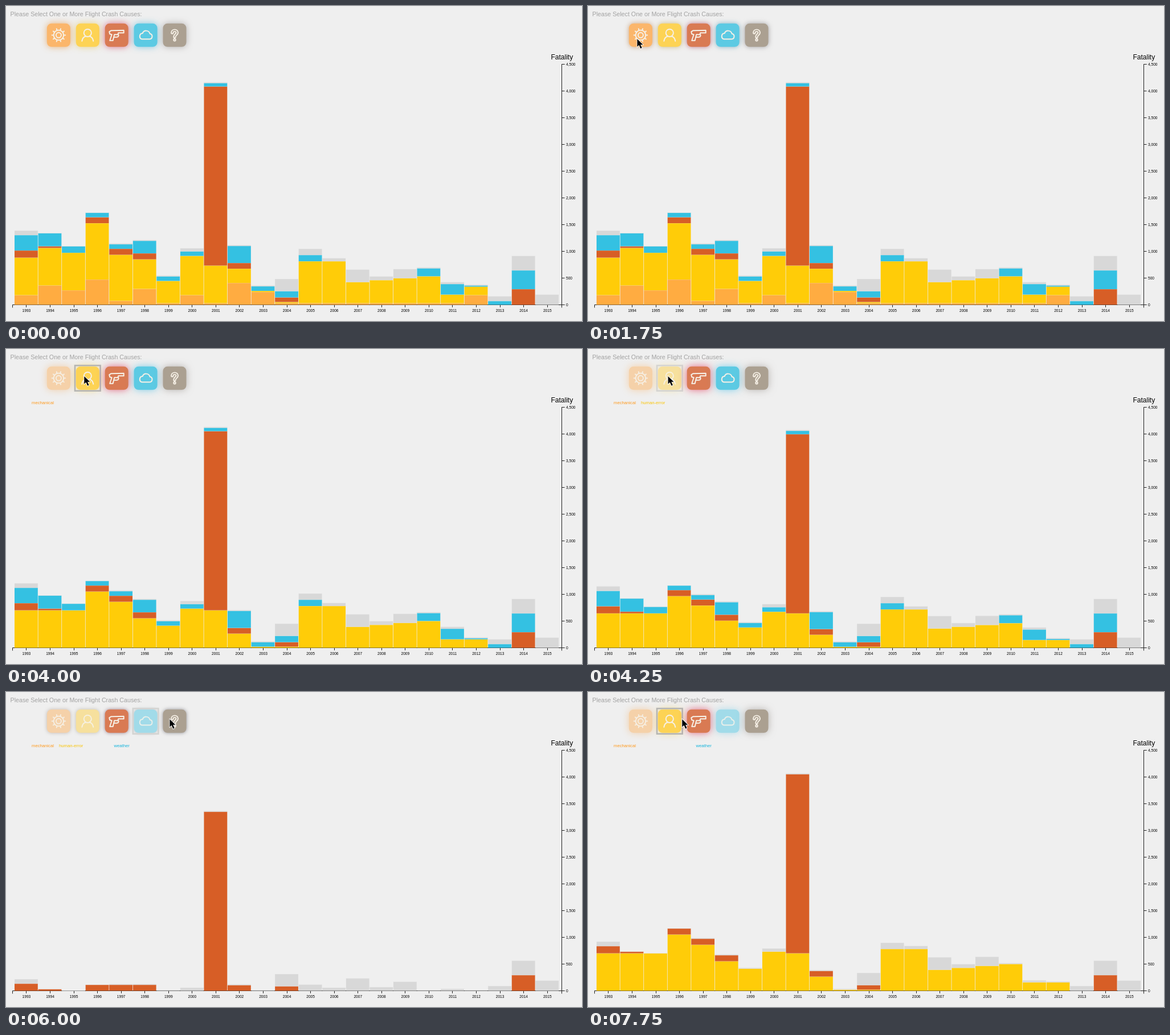
Write an HTML page with a canvas that moves like this. It is 1011 by 554 pixels and loops after 8000 ms.

```html
<!DOCTYPE html>
<html lang="en">
<head>
<meta charset="utf-8">
<title>Flight crash causes</title>
<style>
  html, body { margin: 0; width: 100%; height: 100%; overflow: hidden; background: #efefef; }
  canvas { display: block; }
</style>
</head>
<body>
<canvas id="stage" width="1011" height="554"></canvas>
<script>
const ctx = document.getElementById('stage').getContext('2d');
const LOOP = 8000, STEP = 250, DELAY = 100, FADE = 550;
const FIRST = 1993, LAST = 2015;
const BASE = 525.5, TOP = 102.5, AXIS_X = 975.5;
const BAR_X = 15, PITCH = 41.56, BAR_W = 40.8;
const FONT = '"Liberation Sans", Arial, sans-serif';
const BG = [239, 239, 239];

// Bar heights in pixels: a usual level per year, with peaks where a year stands out
const CAUSES = [
  {
    bar: '#ffac41', tint: [251, 182, 107], glow: [255, 160, 60],
    label: 'mechanical', x: 45, ink: '#ff9a1c', clicks: [2750],
    level: y => y < 2012 ? 3 : 0,
    peaks: { 1993: 17, 1994: 34, 1995: 25.5, 1996: 44.5, 1997: 7, 1998: 28, 2000: 17, 2002: 38.5, 2003: 22.5, 2012: 17 }
  },
  {
    bar: '#ffcc08', tint: [253, 211, 84], glow: [255, 215, 80],
    label: 'human-error', x: 93, ink: '#fac400', clicks: [4000, 6850],
    level: y => y < 2002 ? 66 : y < 2005 ? 2 : y < 2011 ? 37 + 3.4 * (y - 2007) : y < 2013 ? 15 : 0,
    peaks: { 1996: 99, 1997: 81, 1998: 52, 1999: 39, 2000: 69, 2002: 25, 2005: 73.5, 2006: 73.5 }
  },
  {
    bar: '#d75e26', tint: [217, 122, 83], glow: [228, 50, 85], clicks: [],
    level: y => y < 1999 ? 10.5 : 0,
    peaks: { 1993: 12.5, 1994: 3, 1995: 0, 2001: 315, 2002: 10, 2004: 8, 2014: 27.5 }
  },
  {
    bar: '#34c1e2', tint: [92, 202, 227], glow: [80, 195, 235],
    label: 'weather', x: 189.5, ink: '#14b4dc', clicks: [5300],
    level: y => y < 2004 ? 8 : y < 2006 ? 11 : 0,
    peaks: { 1993: 27, 1994: 23, 1995: 11.5, 1998: 22, 2001: 6, 2002: 30, 2010: 14, 2011: 18.5, 2012: 2, 2013: 6.5, 2014: 33 }
  },
  {
    bar: '#d8d8d8', tint: [171, 160, 145], glow: [160, 155, 150], clicks: [],
    level: y => y < 1997 ? .5 : 1.5,
    peaks: { 1993: 8, 2000: 5.5, 2004: 21.5, 2005: 11, 2006: 5.5, 2007: 22, 2008: 6.5, 2009: 16, 2011: 3.5, 2013: 8.5, 2014: 25.5, 2015: 18 }
  }
];

// Pointer stops: time and icon position
const STOPS = [[500, 4.8], [1750, 0], [2750, -.1], [4000, 1], [5250, 3], [6000, 3.95], [7000, 1.1], [7750, 1.55]];

const clamp = v => Math.max(0, Math.min(1, v));
const lerp = (a, b, k) => a + (b - a) * k;
const mix = (a, b, k) => a.map((v, i) => lerp(v, b[i], k));
const rgba = (c, a = 1) => `rgba(${c.map(Math.round).join()},${a})`;
const ease = k => k < .5 ? 4 * k ** 3 : 1 - 4 * (1 - k) ** 3;
const iconX = i => 92.4 + i * 50.9;
const height = (c, year) => c.peaks[year] ?? c.level(year);
const isOff = (c, t) => c.clicks.filter(k => t >= k + DELAY).length % 2 === 1;

// Each click toggles a cause: the first hides it, the next shows it again
const share = (c, t) => c.clicks.reduce(
  (sum, k, i) => sum + (i % 2 ? 1 : -1) * ease(clamp((t - k - DELAY) / FADE)), 1);

function focused(t) {
  const last = c => Math.max(0, ...c.clicks.filter(k => k <= t));
  return CAUSES.reduce((a, b) => last(b) > last(a) ? b : a);
}

function text(str, x, y, size, color, align = 'left') {
  ctx.font = `${size}px ${FONT}`;
  ctx.textAlign = align;
  ctx.fillStyle = color;
  ctx.fillText(str, x, y);
}

function line(...p) {
  ctx.beginPath();
  for (let i = 0; i < p.length; i += 2) ctx.lineTo(p[i], p[i + 1]);
  ctx.stroke();
}

function ring(x, y, r) {
  ctx.beginPath();
  ctx.arc(x, y, r, 0, 7);
  ctx.stroke();
}

const trace = d => ctx.stroke(new Path2D(d));

// Glyphs are centred on the icon
const GLYPHS = [
  () => {
    ring(0, 0, 8.8);
    ring(0, 0, 4.5);
    for (let i = 0; i < 10; i++) {
      const a = i * Math.PI / 5, c = Math.cos(a), s = Math.sin(a);
      line(c * 9.5, s * 9.5, c * 11.8, s * 11.8);
    }
  },
  () => {
    ring(0, -4, 6.6);
    trace('M-10 10.5C-9 5-5.5 2.5-3.5 2M10 10.5C9 5 5.5 2.5 3.5 2');
  },
  () => trace('M-13-6L-10-8L12.5-8.5V-4H3L2-1H-4L-6.5 9.5H-12L-8.5-1L-12-2ZM-4.5 3.5H0C3 3.5 4 1 3-1.5'),
  () => trace('M-6.5 7H7A4.8 4.8 0 0 0 7.5-2.5A6.8 6.8 0 0 0-5.5-3.2A5.2 5.2 0 0 0-6.5 7Z'),
  fill => {
    const outline = [[5.4, ctx.strokeStyle], [1.6, fill]];
    for (const [w, color] of outline) {
      ctx.lineWidth = w;
      ctx.strokeStyle = color;
      trace('M-4.2-4.3C-4.2-9.5 4.5-9.5 4.3-4.3C4-1.2 0-1 0 3M0 8.2V8.4');
    }
  }
];

function drawIcon(c, i, t) {
  const off = isOff(c, t);
  const pulse = .5 + .5 * Math.cos((t - 650) / 3750 * 2 * Math.PI);
  const fill = rgba(off ? mix(BG, c.tint, .53) : c.tint);

  ctx.save();
  ctx.translate(iconX(i), 51.3);
  ctx.shadowColor = rgba(mix([85, 85, 95], c.glow, Math.sqrt(pulse)), off ? .4 : .7);
  ctx.shadowBlur = lerp(6, 14, pulse);
  ctx.fillStyle = fill;
  ctx.beginPath();
  ctx.roundRect(-20.5, -20.5, 41, 41, 8);
  ctx.fill();
  ctx.shadowColor = 'transparent';

  if (focused(t) === c && t >= c.clicks[0]) {
    ctx.strokeStyle = off ? '#d4d4d2' : '#b5b5b3';
    ctx.lineWidth = 2.6;
    ctx.strokeRect(-22.3, -22.3, 44.6, 44.6);
  }
  ctx.strokeStyle = off ? 'rgba(246,242,234,.85)' : '#f6f0e6';
  ctx.lineWidth = 2;
  ctx.lineJoin = ctx.lineCap = 'round';
  GLYPHS[i](fill);
  ctx.restore();
}

function drawBars(t) {
  const shares = CAUSES.map(c => share(c, t));
  for (let year = FIRST; year <= LAST; year++) {
    const x = BAR_X + (year - FIRST) * PITCH;
    let y = BASE;
    CAUSES.forEach((c, i) => {
      const h = height(c, year) * shares[i];
      if (h < .05) return;
      y -= h;
      ctx.fillStyle = c.bar;
      ctx.fillRect(x, y, BAR_W, h);
      ctx.fillStyle = 'rgba(239,239,239,.5)';
      ctx.fillRect(x, y - .4, BAR_W, .8);
    });
  }
}

function drawAxes() {
  ctx.strokeStyle = '#222';
  ctx.lineWidth = 1;
  line(980.5, TOP, AXIS_X, TOP, AXIS_X, BASE, 980.5, BASE);
  for (let v = 0; v <= 4500; v += 500) {
    const y = lerp(BASE, TOP, v / 4500), tick = Math.floor(y) + .5;
    line(AXIS_X, tick, 980.5, tick);
    text(v.toLocaleString('en-US'), 983, y + 2.3, 6.6, '#000');
  }
  line(11.5, 530.5, 11.5, BASE, AXIS_X, BASE, AXIS_X, 530.5);
  for (let year = FIRST; year <= LAST; year++) {
    const x = BAR_X + (year - FIRST) * PITCH + BAR_W / 2 + .5;
    const tick = Math.floor(x) + .5;
    line(tick, BASE, tick, 530);
    text(year, x, 538, 6.6, '#000', 'center');
  }
  text('Fatality', 956.5, 94, 12, '#000');
}

function drawPointer(t) {
  if (t < STOPS[0][0]) return;
  const next = Math.max(1, STOPS.findIndex(s => s[0] >= t));
  const [a, b] = [STOPS[next - 1], STOPS[next]];
  const spot = lerp(a[1], b[1], ease(clamp((t - a[0]) / (b[0] - a[0]))));
  const drop = 37 * clamp((2750 - t) / 2250) ** 1.6;
  const arrow = new Path2D('M0 0V13.5L3.2 10.6L5.8 16.6L8.3 15.5L5.7 9.8H10Z');
  ctx.save();
  ctx.translate(iconX(spot) - 6, 48 + drop);
  ctx.strokeStyle = '#fff';
  ctx.lineWidth = 1.6;
  ctx.stroke(arrow);
  ctx.fillStyle = '#000';
  ctx.fill(arrow);
  ctx.restore();
}

function draw(t) {
  ctx.fillStyle = rgba(BG);
  ctx.fillRect(0, 0, 1011, 554);
  text('Please Select One or More Flight Crash Causes:', 7.5, 18, 10.7, '#a2a2a2');
  CAUSES.forEach((c, i) => {
    drawIcon(c, i, t);
    if (isOff(c, t)) text(c.label, c.x, 97, 7.7, c.ink);
  });
  drawAxes();
  drawBars(t);
  drawPointer(t);
}

const start = performance.now();
function tick() {
  const t = (performance.now() - start) % LOOP;
  draw(Math.floor(t / STEP) * STEP);
  requestAnimationFrame(tick);
}
tick();
</script>
</body>
</html>
```
